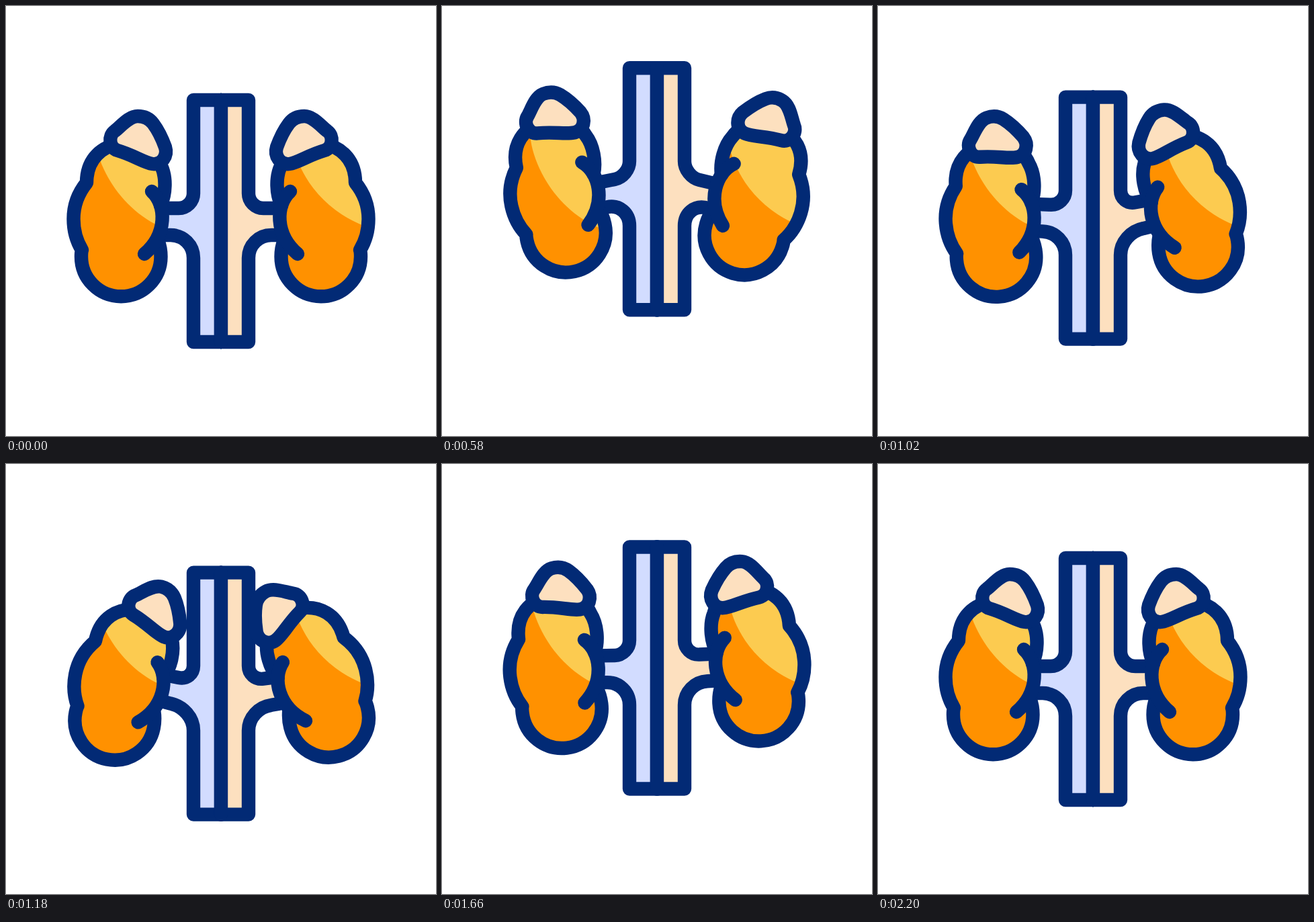
Recreate the animation shown at these times as an HTML page. Size 640 by 640 pixels, loop 2420 ms.

```html
<!DOCTYPE html>
<html lang="en">
<head>
<meta charset="utf-8">
<title>Kidneys</title>
<style>
  html, body { margin: 0; width: 100%; height: 100%; overflow: hidden; background: #fff; }
  svg { display: block; width: 100vw; height: 100vh; }
  .line { fill: none; stroke: #022a75; stroke-width: 20.4; stroke-linecap: round; stroke-linejoin: round; }
  .orange { fill: #ff9100; }
  .yellow { fill: #fccb50; }
  .peach { fill: #fde0bf; }
  .lilac { fill: #d2dcff; }
</style>
</head>
<body>
<svg viewBox="0 0 640 640">
  <defs>
    <path id="rim" d="M230 297C238 280 239 255 231 238C216 190 120 190 120 263C107 279 100.5 297 100.5 317C100.5 335 105 350 113 363C112 366 112 369 112 373A59.25 59.25 0 0 0 230.5 373C230.5 364 229 356 226 348"/>
    <path id="inlet" d="M217 276C239 296 240 340 206 369"/>
    <path id="body" d="M230 297C238 280 239 255 231 238C216 190 120 190 120 263C107 279 100.5 297 100.5 317C100.5 335 105 350 113 363C112 366 112 369 112 373A59.25 59.25 0 0 0 230.5 373C230.5 364 229 356 226 348C236 330 237 312 230 297Z"/>
    <path id="gland" d="M196 164C206 164 213 167 219 175C228 187 233 199 237 210C241 223 232 237 218 235C205 233 190 222 166 215C153 211 152 193 162 186C172 178 183 164 196 164Z"/>
    <clipPath id="inside"><use href="#body"/></clipPath>
  </defs>
  <g id="all"></g>
</svg>
<script>
const LOOP = 2420;
const HILUM = '233 318', ROOT = '190 243';
const GLAND_GAIN = 1.18, ARM_GAIN = -.62;

// [time, value] pairs, eased in and out between neighbours
const LIFT = [[0, 0], [697, -51.5], [1263, 26], [1690, -17], [2070, 0]];
const SWING = [[0, 0], [620, -18.5], [1080, 15.3], [1400, -9.4], [1630, 4], [1770, -2], [1910, 0]];

// Each part repeats the swing after its own delay
const SIDES = [
  {
    flip: '', fill: 'lilac', arm: 130, kidney: 200, gland: 290,
    shine: 'M132 200C140 250 178 308 236 331H260V120H132Z'
  },
  {
    flip: 'translate(640 0) scale(-1 1)', fill: 'peach', arm: 0, kidney: 68, gland: 192,
    shine: 'M215 196C207 250 169 304 105 328H70V120H215Z'
  }
];

const all = document.getElementById('all');

function at(keys, t) {
  if (t <= 0) return keys[0][1];
  for (let i = 1; i < keys.length; i++) {
    const [t1, v1] = keys[i];
    if (t < t1) {
      const [t0, v0] = keys[i - 1];
      const x = (t - t0) / (t1 - t0);
      return v0 + (v1 - v0) * x * x * (3 - 2 * x);
    }
  }
  return keys[keys.length - 1][1];
}

function build(side) {
  return `<g transform="${side.flip}">
    <path class="${side.fill}" data-part="tube"/>
    <path class="line" data-part="wall"/>
    <path class="line" d="M320 140V500"/>
    <g data-part="kidney">
      <use href="#body" class="orange"/>
      <g clip-path="url(#inside)"><path d="${side.shine}" class="yellow" data-part="shine"/></g>
      <use href="#rim" class="line"/>
      <use href="#inlet" class="line"/>
      <g data-part="gland">
        <use href="#gland" class="peach"/>
        <use href="#gland" class="line"/>
      </g>
    </g>
  </g>`;
}

// Outline of half the vessel, with the arm's outer end shifted down by a
function vessel(a) {
  const upper = `M320 140H279V279C279 291 269 ${301 + a * .23} 257 ${301 + a * .5}L233 ${301 + a}`;
  const lower = `233 ${341 + a}L245 ${341 + a * .65}C264 ${341 + a * .2} 279 356 279 375V500H320`;
  return { tube: `${upper}L${lower}Z`, wall: `${upper}M${lower}` };
}

all.innerHTML = SIDES.map(build).join('');
SIDES.forEach((side, i) => {
  side.parts = {};
  all.children[i].querySelectorAll('[data-part]').forEach(el => {
    side.parts[el.dataset.part] = el;
  });
});

function draw(t) {
  const lift = at(LIFT, t);
  all.setAttribute('transform', `translate(0 ${lift})`);
  for (const side of SIDES) {
    const { tube, wall, kidney, shine, gland } = side.parts;
    const shape = vessel(ARM_GAIN * at(SWING, t - side.arm));
    const turn = at(SWING, t - side.kidney);
    tube.setAttribute('d', shape.tube);
    wall.setAttribute('d', shape.wall);
    kidney.setAttribute('transform', `rotate(${turn} ${HILUM})`);
    // The shine stays still on the stage while the kidney moves under it
    shine.setAttribute('transform', `rotate(${-turn} ${HILUM}) translate(0 ${-lift})`);
    gland.setAttribute('transform', `rotate(${GLAND_GAIN * at(SWING, t - side.gland)} ${ROOT})`);
  }
}

const start = performance.now();
function tick() {
  draw((performance.now() - start) % LOOP);
  requestAnimationFrame(tick);
}
tick();
</script>
</body>
</html>
```
